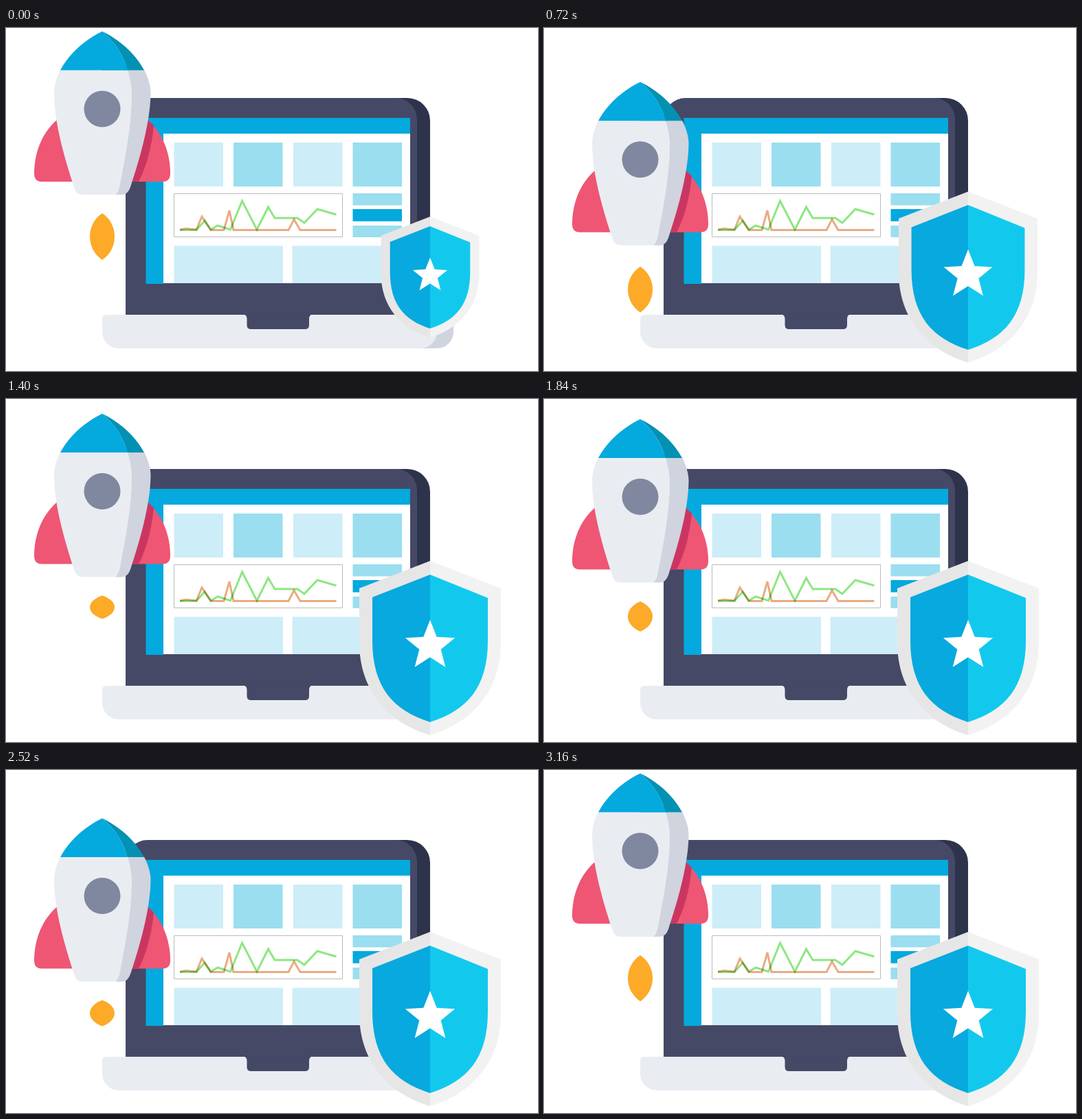
An HTML page that plays this animation: 774 by 500 pixels, repeating every 3.2 s.

```html
<!DOCTYPE html>
<html>
<head>
<meta charset="utf-8">
<style>
html, body { margin: 0; width: 100%; height: 100%; overflow: hidden; background: #fff; }
svg { display: block; }
</style>
</head>
<body>
<svg width="774" height="500" viewBox="0 0 774 500">
  <!-- laptop -->
  <path fill="#2e334c" d="M560 102H584A33 33 0 0 1 617 135V418H560Z"/>
  <path fill="#454966" d="M174 418V134A32 32 0 0 1 206 102H568A30 32 0 0 1 598 134V418Z"/>
  <path fill="#d0d4de" d="M590 418H651V443A24 24 0 0 1 627 467H590Z"/>
  <path fill="#e9edf2" d="M146 418H627V443A24 24 0 0 1 603 467H164A24 24 0 0 1 140 443V424Q140 418 146 418Z"/>
  <path fill="#454966" d="M345 417.5Q350.500 418 350.500 424V433Q350.500 439 356.500 439H435Q441 439 441 433V424Q441 418 446 417.500Z"/>
  <path fill="#04a9de" d="M203.500 131H588V160H229V373H203.500Z"/>
  <path fill="#fff" d="M229 154H588V372H229Z"/>
  <path fill="#cdedf8" d="M244.500 167h71.500v64h-71.500zM418 167h71.500v64h-71.500zM244.500 317.500h158.500v54.500h-158.500zM416.500 317.500h159.500v54.500h-159.500z"/>
  <path fill="#9adef0" d="M331 167h71.500v64h-71.500zM504.500 167h71.500v64h-71.500zM504.500 241h71.500v17.500h-71.500zM504.500 288h71.500v17h-71.500z"/>
  <path fill="#04a9de" d="M504.500 264h71.500v17.700h-71.500z"/>
  <path fill="#fff" stroke="#bbb" d="M244.500 241.500h245v63h-245z"/>
  <g fill="none" stroke-width="3">
    <path stroke="#eaab82" d="M253 294L262 292.500L277 294L285 275L298 294.500H317L325 266L331 294.500H411L419 279L428 294.500H480.500"/>
    <path stroke="#8de781" style="mix-blend-mode:multiply" d="M253 294.500H277L289 281L298 294L308 288L326.500 294L343.500 252L365 294L381.500 261L391 277H424L434 284L453 264L480.500 272"/>
  </g>

  <g id="shield">
    <path fill="#f2f2f2" d="M617 236L720 276V355C720 425 678 472 617 490Z"/>
    <path fill="#e6e6e6" d="M617 236L514 276V355C514 425 556 472 617 490Z"/>
    <path fill="#12c9ed" d="M617 256L701 290V352C701 420 671 454 617 471Z"/>
    <path fill="#07a9de" d="M617 256L533 289V352C533 420 563 454 617 471Z"/>
    <path id="star" fill="#fff"/>
  </g>

  <path id="flame" fill="#fcaa28" d="M0 0C12 8 18 21 18 34S12 60 0 68C-12 60 -18 47 -18 34S-12 8 0 0Z"/>

  <g id="rocket">
    <path fill="#ee5674" d="M74 134C51 154 41 184 41 212Q41 224 52 224H228Q239 224 239 212C239 184 229 154 206 134Z"/>
    <path fill="#cb3661" d="M206 134L215 142C212 174 204 203 193 224H180Z"/>
    <path fill="#e9edf2" d="M79 61C73 73 70 84 70 95C70 140 87 195 99 232Q102 243 110 243H165L190 140L180 61Z"/>
    <path fill="#d0d4de" d="M177 61H201C207 73 210.500 84 210.500 95C210 140 193 195 181 232Q177 243 169 243H159.500Q164 239 166 228C174 185 183 140 183 97C183 84 180 71 177 61Z"/>
    <path fill="#04a9de" d="M140 5C115 17 92 37 79 61.500H180Z"/>
    <path fill="#0391b3" d="M140 5C165 17 188 37 201 61.500H177C170 38 158 20 140 5Z"/>
    <path fill="#04a9de" d="M140 5C158 20 170 38 177 61.500H139Z"/>
    <circle cx="140" cy="118" r="26.500" fill="#8088a0"/>
  </g>
</svg>
<script>
const STEP = 40, STEPS = 80, CYCLE = 40;
const get = id => document.getElementById(id);
const [shield, star, flame, rocket] = ['shield', 'star', 'flame', 'rocket'].map(get);

star.setAttribute('d', 'M' + Array.from({ length: 10 }, (_, i) => {
  const r = i % 2 ? 16.5 : 38, a = i * Math.PI / 5;
  return [617 + r * Math.sin(a), 360 - r * Math.cos(a)];
}).join('L') + 'Z');

// cubic-bezier(.25, .1, .25, 1)
function ease(x) {
  const curve = (s, a, b) => 3 * s * (1 - s) ** 2 * a + 3 * s * s * (1 - s) * b + s ** 3;
  let lo = 0, hi = 1;
  for (let i = 0; i < 20; i++) {
    const mid = (lo + hi) / 2;
    if (curve(mid, .25, .25) < x) lo = mid; else hi = mid;
  }
  return curve(lo, .1, 1);
}

// [step, scale]: grows, dips back a little, settles
const shieldKeys = [[0, .694], [8, 1], [13, .962], [23, 1]];

function shieldScale(n) {
  for (let i = 1; i < shieldKeys.length; i++) {
    const [n0, s0] = shieldKeys[i - 1], [n1, s1] = shieldKeys[i];
    if (n <= n1) return s0 + (s1 - s0) * (1 - Math.cos(Math.PI * (n - n0) / (n1 - n0))) / 2;
  }
  return 1;
}

function draw(now) {
  const n = Math.floor(now / STEP) % STEPS, k = n % CYCLE;
  const drop = 4.1 * Math.min(k, 39 - k);
  rocket.setAttribute('transform', `translate(0 ${drop})`);

  // the flame hurries towards the lowest point of the flight
  const j = k > 15 && k < 20 ? 15 + (k - 15) * 1.25 : k;
  const y = k < 20 ? Math.min(j * 4.15, 78) : drop;
  const p = ease(j % 5 / 5);
  const stretch = Math.floor(j / 5) % 2 ? .5 + p / 2 : 1 - p / 2;
  flame.setAttribute('transform', `translate(140 ${270 + y}) scale(1 ${stretch})`);

  shield.setAttribute('transform',
    `translate(617 363.5) scale(${shieldScale(n)}) translate(-617 -363.5)`);
}

let start;
function tick(now) {
  start ??= now;
  draw(now - start);
  requestAnimationFrame(tick);
}
draw(0);
requestAnimationFrame(tick);
</script>
</body>
</html>
```
